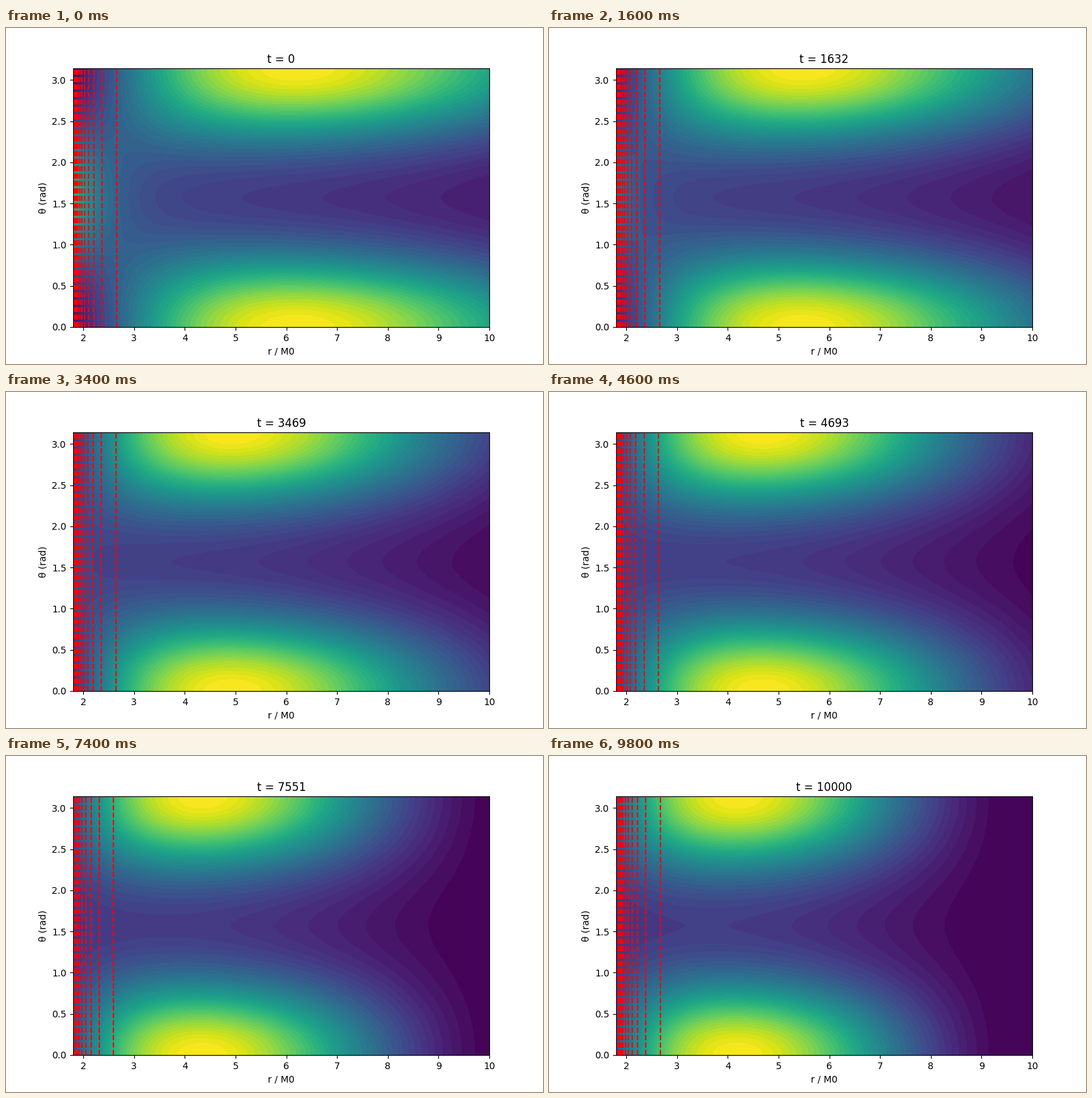
Recreate the animation shown at these times as a matplotlib script. Size 800 px wide and 500 px high, loop 10000 ms.

```python
import numpy as np
import matplotlib.pyplot as plt
from matplotlib.animation import FuncAnimation

FRAMES = 50
T_END = 10000
R_MIN, R_MAX = 1.8, 10
times = np.linspace(0, T_END, FRAMES)

r = np.linspace(R_MIN, R_MAX, 240)
theta = np.linspace(0, np.pi, 161)
cos2 = np.cos(theta)[:, None] ** 2


def pole_amplitude(s):
    """Cloud along the axis: a rise, a peak of 1 and a node further out."""
    decay = np.exp(-2.5 * s)
    peak = 4 + 2.2 * decay
    node = 8.95 + 9 * decay
    power = 0.55 + 0.4 * decay
    inner = 1.4
    # This rate puts the maximum exactly at the peak radius
    rate = power / (peak - inner) - 1 / (node - peak)
    rise = ((r - inner) / (peak - inner)) ** power
    return rise * np.exp(-rate * (r - peak)) * (node - r) / (node - peak)


def equator_amplitude(s):
    """Weak parabolic cloud plus a horizon layer that dies away."""
    cloud = 0.42 - (0.0035 + 0.0085 * s) * (r - 3.6) ** 2
    layer = 0.41 * np.exp(-5 * s - 1.25 * (r - R_MIN))
    return cloud + layer


def density(s):
    pole, equator = pole_amplitude(s), equator_amplitude(s)
    field = (equator + (pole - equator) * cos2) ** 2
    return np.clip(field, 0, 0.9999)


def ring_radii(s):
    n = np.arange(11)
    scale = 1 - 0.045 * s ** 2
    if s > 0.95:  # the rings snap back outwards near the end
        scale += 0.05
    return scale * (1.6 + 1 / (0.943 + 0.35 * n))


fig, ax = plt.subplots(figsize=(8, 5), dpi=100)


def draw(frame):
    t = times[frame]
    s = t / T_END
    bands = 40 + round(5 * np.sin(np.pi * s))
    ax.clear()
    ax.contourf(r, theta, density(s), levels=np.linspace(0, 1, bands + 1),
                cmap="viridis")
    for radius in ring_radii(s):
        ax.axvline(radius, color="red", linestyle="--")
    ax.set_xlim(R_MIN, R_MAX)
    ax.set_ylim(0, np.pi)
    ax.set_xlabel("r / M0")
    ax.set_ylabel("θ (rad)")
    ax.set_title(f"t = {int(t)}")
    return []


anim = FuncAnimation(fig, draw, frames=FRAMES, init_func=lambda: draw(0),
                     interval=200, repeat=True, repeat_delay=0)
plt.show()
```
